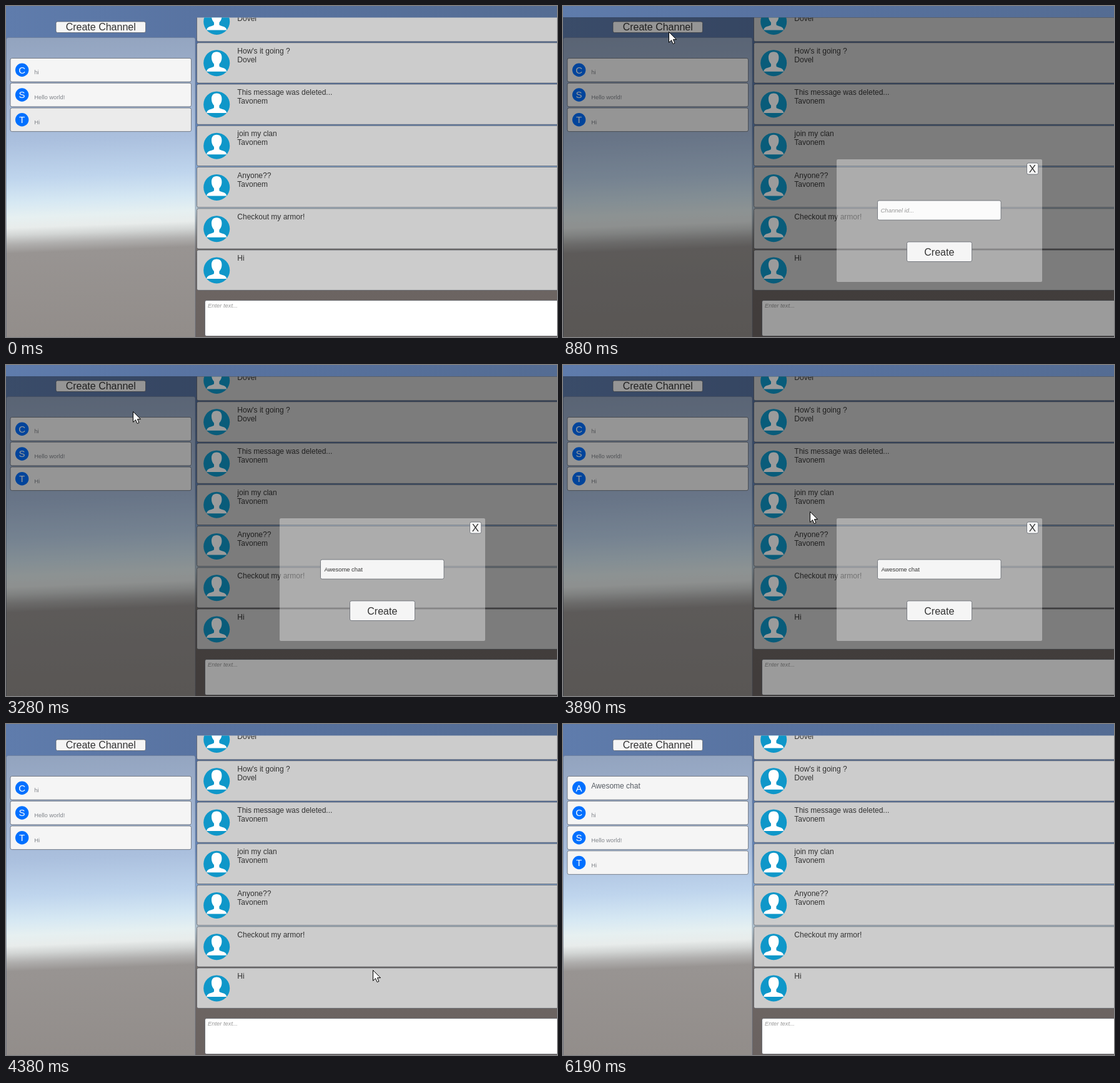
These frames come from a looping animation (882 px wide and 529 px high, 6320 ms). An HTML page:

```html
<!DOCTYPE html>
<html lang="en">
<head>
<meta charset="utf-8">
<title>Chat channels</title>
<style>
  html, body { margin: 0; width: 100%; height: 100%; overflow: hidden; }
  svg { display: block; width: 882px; height: 529px; font-family: "Liberation Sans", Arial, sans-serif; }
  text { white-space: pre; }
</style>
</head>
<body>
<svg id="stage" viewBox="0 0 882 529">
  <defs>
    <linearGradient id="top">
      <stop offset="0" stop-color="#5f7cac"/>
      <stop offset=".35" stop-color="#5873a1"/>
      <stop offset="1" stop-color="#546c93"/>
    </linearGradient>
    <linearGradient id="sky" gradientUnits="userSpaceOnUse" x1="0" y1="0" x2="0" y2="529">
      <stop offset=".1" stop-color="#536d9a"/>
      <stop offset=".38" stop-color="#6485b8"/>
      <stop offset=".5" stop-color="#88a9d2"/>
      <stop offset=".62" stop-color="#b5c6d0"/>
      <stop offset=".7" stop-color="#85827f"/>
      <stop offset=".75" stop-color="#6d6663"/>
      <stop offset="1" stop-color="#6a6260"/>
    </linearGradient>
    <linearGradient id="side" gradientUnits="userSpaceOnUse" x1="140" y1="50" x2="158" y2="529">
      <stop offset="0" stop-color="#93a4bf"/>
      <stop offset=".2" stop-color="#a0b3d0"/>
      <stop offset=".34" stop-color="#abc0de"/>
      <stop offset=".46" stop-color="#bfd5ed"/>
      <stop offset=".54" stop-color="#d6e8f3"/>
      <stop offset=".59" stop-color="#e6f0f1"/>
      <stop offset=".625" stop-color="#e8eceb"/>
      <stop offset=".65" stop-color="#d2d5d4"/>
      <stop offset=".68" stop-color="#b0afae"/>
      <stop offset=".71" stop-color="#989492"/>
      <stop offset="1" stop-color="#928d8a"/>
    </linearGradient>
    <clipPath id="below"><path d="M0 18.5H882V529H0Z"/></clipPath>
  </defs>
  <rect width="882" height="529" fill="url(#sky)"/>
  <rect width="882" height="52" fill="url(#top)"/>
  <rect x=".5" y="50.5" width="302.5" height="484" rx="3" fill="url(#side)" stroke="#66748c" stroke-opacity=".5"/>
  <g id="scene"></g>
  <g id="modal">
    <rect y="18" width="882" height="511" fill="#000" fill-opacity=".392"/>
    <rect x="438" y="245" width="329" height="196" rx="2" fill="#fff" fill-opacity=".37"/>
  </g>
  <circle id="click" r="12" fill="#e6e632" fill-opacity=".75"/>
  <path id="cursor" d="M0 0V16.8L4 13.1L6.7 19L9.4 17.8L6.9 12.1H12Z" fill="#fff" stroke="#000" stroke-linejoin="round"/>
</svg>
<script>
const LOOP = 6320, STEP = 70;
const $ = id => document.getElementById(id);

function add(parent, tag, attrs, label) {
  const el = document.createElementNS("http://www.w3.org/2000/svg", tag);
  for (const key in attrs) el.setAttribute(key, attrs[key]);
  if (label) el.textContent = label;
  parent.appendChild(el);
  return el;
}

function box(parent, x, y, width, height, fill) {
  return add(parent, "rect", { x, y, width, height, rx: 2.5, fill, stroke: "#4c5059", "stroke-opacity": .65 });
}

function write(parent, x, y, size, fill, label, more) {
  return add(parent, "text", { x, y, "font-size": size, fill, ...more }, label);
}

const centred = { "text-anchor": "middle" };
const italic = { "font-style": "italic" };
const scene = $("scene"), modal = $("modal");

// Message list
const messages = [
  ["", "Dovel"], ["How's it going ?", "Dovel"], ["This message was deleted...", "Tavonem"],
  ["join my clan", "Tavonem"], ["Anyone??", "Tavonem"], ["Checkout my armor!", ""], ["Hi", ""]
];
const bust = "M0 -18C6 -18 8.6 -14 8.2 -8C8 -4 6.5 -1 4.2 1.5V5C6 8 15.5 6.5 16 13.5H-16" +
  "C-15.5 6.5 -6 8 -4.2 5V1.5C-6.5 -1 -8 -4 -8.2 -8C-8.6 -14 -6 -18 0 -18Z";
const list = add(scene, "g", { "clip-path": "url(#below)" });
messages.forEach(([body, name], i) => {
  const y = -7.5 + i * 66.25;
  box(list, 305.5, y, 590, 64.3, "#ccc");
  const face = add(list, "g", { transform: `translate(337.2 ${y + 32.4})` });
  add(face, "circle", { r: 21, fill: "#0f97c9" });
  add(face, "path", { d: bust, fill: "#fff" });
  write(list, 370.3, y + 17.2, 12, "#323232", body);
  write(list, 370.3, y + 31, 12, "#323232", name);
});

const input = box(scene, 318.5, 470.5, 590, 57, "#fff");
write(scene, 323, 482.3, 9.4, "#989898", "Enter text...", italic);

// Channel list
const openButton = box(scene, 80, 25, 143.5, 17.5, "#f5f5f5");
write(scene, 151.7, 39.3, 16, "#323232", "Create Channel", centred);

function channel(letter, last, title) {
  const g = add(scene, "g", {});
  const back = box(g, 7, 83.5, 289.5, 37.6, "#f5f5f5");
  add(g, "circle", { cx: 25.6, cy: 102.2, r: 10.7, fill: "#0070ff" });
  write(g, 25.6, 107.5, 15, "#fff", letter, centred);
  write(g, 45.3, 103, 12, "#555b62", title);
  write(g, 45.3, 109.3, 9.4, "#80848a", last);
  return { g, back };
}
const fresh = channel("A", "", "Awesome chat");
const channels = [channel("C", "hi"), channel("S", "Hello world!"), channel("T", "Hi")];

// Dialog
box(modal, 742.5, 251, 18.2, 18, "#f5f5f5");
write(modal, 751.5, 266, 17, "#323232", "X", centred);
const field = box(modal, 503.5, 311, 197.5, 31, "#fff");
const hint = write(modal, 508.5, 330.3, 9.5, "#989898", "Channel id...", italic);
const typed = write(modal, 509.5, 330.2, 9.4, "#323232", "");
const makeButton = box(modal, 550.5, 377, 104, 31.5, "#f5f5f5");
write(modal, 602.3, 398.8, 16, "#323232", "Create", centred);

const keys = [[1820, 1], [2150, 2], [2220, 3], [2420, 4], [2550, 5], [2680, 7],
  [2880, 9], [3010, 10], [3150, 11], [3280, 12]];

const moves = [
  { at: 70, steps: 7, from: [875, 549], to: [169, 41] },
  { at: 1080, steps: 4, from: [169, 41], to: [203, 74] },
  { at: 3680, steps: 8, from: [203, 74], to: [587, 393] },
  { at: 5560, steps: 10, from: [587, 393], to: [843, 531] }
];

// Value of the latest [time, value] entry already reached
function latest(t, entries, start) {
  let value = start;
  for (const [at, v] of entries) if (t >= at) value = v;
  return value;
}

function cursorAt(t) {
  const move = latest(t, moves.map(m => [m.at, m]), null);
  if (!move) return [900, 560];
  const u = Math.min(1, (Math.floor((t - move.at + 4) / STEP) + 1) / move.steps);
  const e = u * u * (3 - 2 * u);
  return move.from.map((a, i) => Math.round(a + (move.to[i] - a) * e));
}

const show = (el, on) => el.setAttribute("display", on ? "inline" : "none");
const paint = (el, fill) => el.setAttribute("fill", fill);
const place = (el, x, y) => el.setAttribute("transform", `translate(${x} ${y})`);

function draw(t) {
  const [x, y] = cursorAt(t);
  place($("cursor"), x + .5, y + .5);
  place($("click"), x - .5, y);
  show($("click"), (t >= 740 && t < 880) || (t >= 4170 && t < 4310));

  show(modal, t >= 880 && t < 4380);
  paint(openButton, latest(t, [[740, "#e2e2e2"], [810, "#d0d0d0"], [880, "#f5f5f5"]], "#f5f5f5"));
  paint(makeButton, latest(t, [[4170, "#e2e2e2"], [4240, "#d0d0d0"], [4310, "#ebebeb"]], "#f5f5f5"));
  paint(field, latest(t, [[950, "#f5f5f5"], [4170, "#fafafa"], [4240, "#fff"]], "#fbfbfb"));
  paint(input, x > 318 && y > 470 && y < 528 ? "#f5f5f5" : "#fff");
  paint(channels[2].back, latest(t, [[740, "#eee"], [880, "#f5f5f5"]], "#ebebeb"));

  const count = latest(t, keys, 0);
  typed.textContent = "Awesome chat".slice(0, count);
  show(hint, count === 0);

  const added = t >= 4650;
  show(fresh.g, added);
  channels.forEach((c, i) => place(c.g, 0, (i + added) * 39.75));
}

const start = performance.now();
function tick() {
  draw((performance.now() - start) % LOOP);
  requestAnimationFrame(tick);
}
tick();
</script>
</body>
</html>
```
